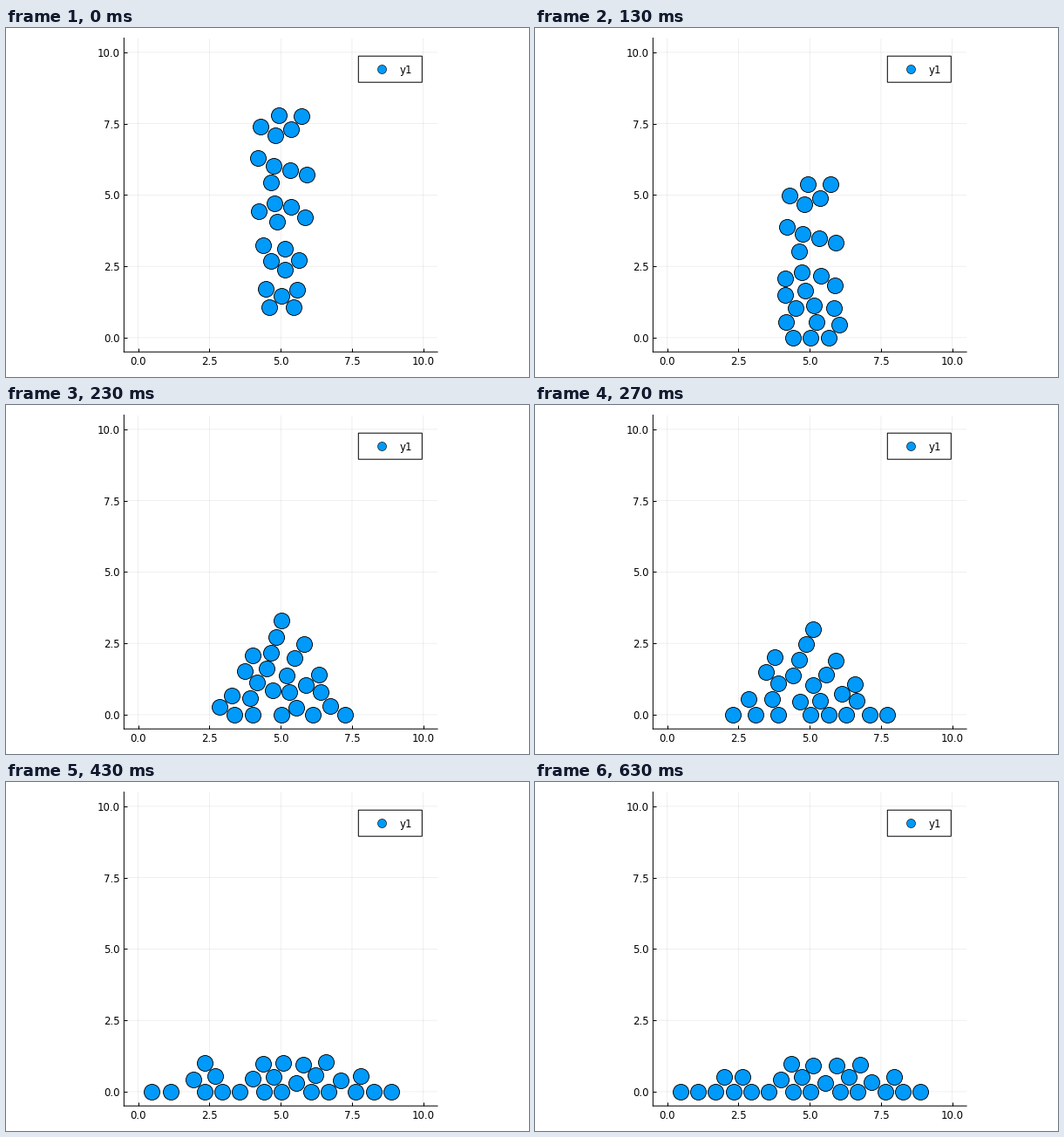
A matplotlib script that plays this animation: 600x400 px, repeating every 0.66 s.

```python
import numpy as np
import matplotlib.pyplot as plt
from matplotlib.animation import FuncAnimation
from matplotlib.patches import Rectangle

W, H, DPI = 600, 400, 100
PT = 72 / DPI                    # points per pixel
UNIT = 32.7                      # pixels per axis unit
X0, FLOOR = 151.7, 354.9         # pixel place of the axis zeros
LOOP_CS = 66                     # loop length in hundredths of a second
RATE = 0.3                       # simulation steps per hundredth
BLUE = "#009AFA"
RADIUS, GAP = 9, 19.3            # drawn radius, centre distance at contact

# Where each ball is dropped: x and height above the floor in pixels,
# sorted by the row it ends in and from left to right.
floor_row = [(295, 105.5), (290, 144.5), (289, 205.5), (298, 55.5), (304, 88),
             (302, 34.5), (311, 132.5), (316, 47.5), (320, 77.5), (330.5, 34.5),
             (343, 138), (336, 89), (334.5, 54.5)]
middle_row = [(292, 241.5), (308, 153.5), (304, 177.5), (326, 192),
              (320, 101.5), (327, 238.5), (327, 149.5), (345, 187)]
top_row = [(307, 197), (309, 231.5), (313, 254.5), (339, 254)]
start_x, start_h = np.array(floor_row + middle_row + top_row).T
order = np.argsort(start_h)


def midpoints(xs):
    return (xs[1:] + xs[:-1]) / 2


def resting_x():
    """Runs of touching balls on the floor, the others in the gaps above."""
    runs = [(167, 6), (296, 2), (350, 2), (402, 3)]
    floor = np.concatenate([x + 20.3 * np.arange(n) for x, n in runs])
    gaps = midpoints(floor)
    middle = np.concatenate([gaps[2:4], gaps[5:11]])
    return np.concatenate([floor, middle, midpoints(middle[2:7])])


end_x = resting_x()


def centres(k):
    """Balls spread sideways with an ease and drop until something holds them."""
    u = np.clip((k - 0.5 - start_h / 58) / 11, 0, 1)
    x = start_x + (end_x - start_x) * u * u * (3 - 2 * u)
    h = start_h - 12.6 * k - 1.74 * k * k
    for n, ball in enumerate(order):
        below = order[:n]
        dx = np.abs(x[below] - x[ball])
        near = below[dx < GAP]
        held = h[near] + np.sqrt(GAP ** 2 - dx[dx < GAP] ** 2)
        h[ball] = max(h[ball], 0, *held)
    return np.column_stack([x, FLOOR - h])


plt.rcParams.update({"font.family": "DejaVu Sans", "path.snap": False})
fig = plt.figure(figsize=(W / DPI, H / DPI), dpi=DPI, facecolor="white")

# Plot frame with ticks and grid
side = 11 * UNIT
ax = fig.add_axes([(X0 - UNIT / 2) / W, 1 - (FLOOR + UNIT / 2) / H, side / W, side / H])
ax.set(xlim=(-0.5, 10.5), ylim=(-0.5, 10.5))
ticks = np.arange(0, 10.1, 2.5)
names = [f"{t:.1f}" for t in ticks]
ax.set_xticks(ticks, names)
ax.set_yticks(ticks, names)
ax.tick_params(direction="in", length=4 * PT, width=PT, pad=3.3, labelsize=11.7 * PT)
ax.grid(color="black", alpha=0.1, linewidth=0.6 * PT)
ax.set_axisbelow(True)
ax.spines[["top", "right"]].set_visible(False)
ax.spines[["left", "bottom"]].set_linewidth(PT)

# Layer in pixel coordinates for the balls and the legend
layer = fig.add_axes([0, 0, 1, 1])
layer.set(xlim=(0.4, W + 0.4), ylim=(H, 0))
layer.axis("off")


def dots(points, radius, edge):
    return layer.scatter(*np.transpose(points), s=(2 * radius * PT) ** 2, c=BLUE,
                         edgecolors="black", linewidths=edge * PT, zorder=3)


balls = dots(centres(0), RADIUS, 0.9)
layer.add_patch(Rectangle((404.7, 32.2), 73, 30, fc="white", ec="black", lw=PT))
dots([(431.7, 47.4)], 5, 0.6)
layer.text(452.2, 51.7, "y1", fontsize=11.7 * PT, va="baseline")


def update(cs):
    balls.set_offsets(centres(int((cs + 0.5) * RATE)))
    return balls,


anim = FuncAnimation(fig, update, frames=LOOP_CS, interval=10, repeat=True, repeat_delay=0)
plt.show()
```
